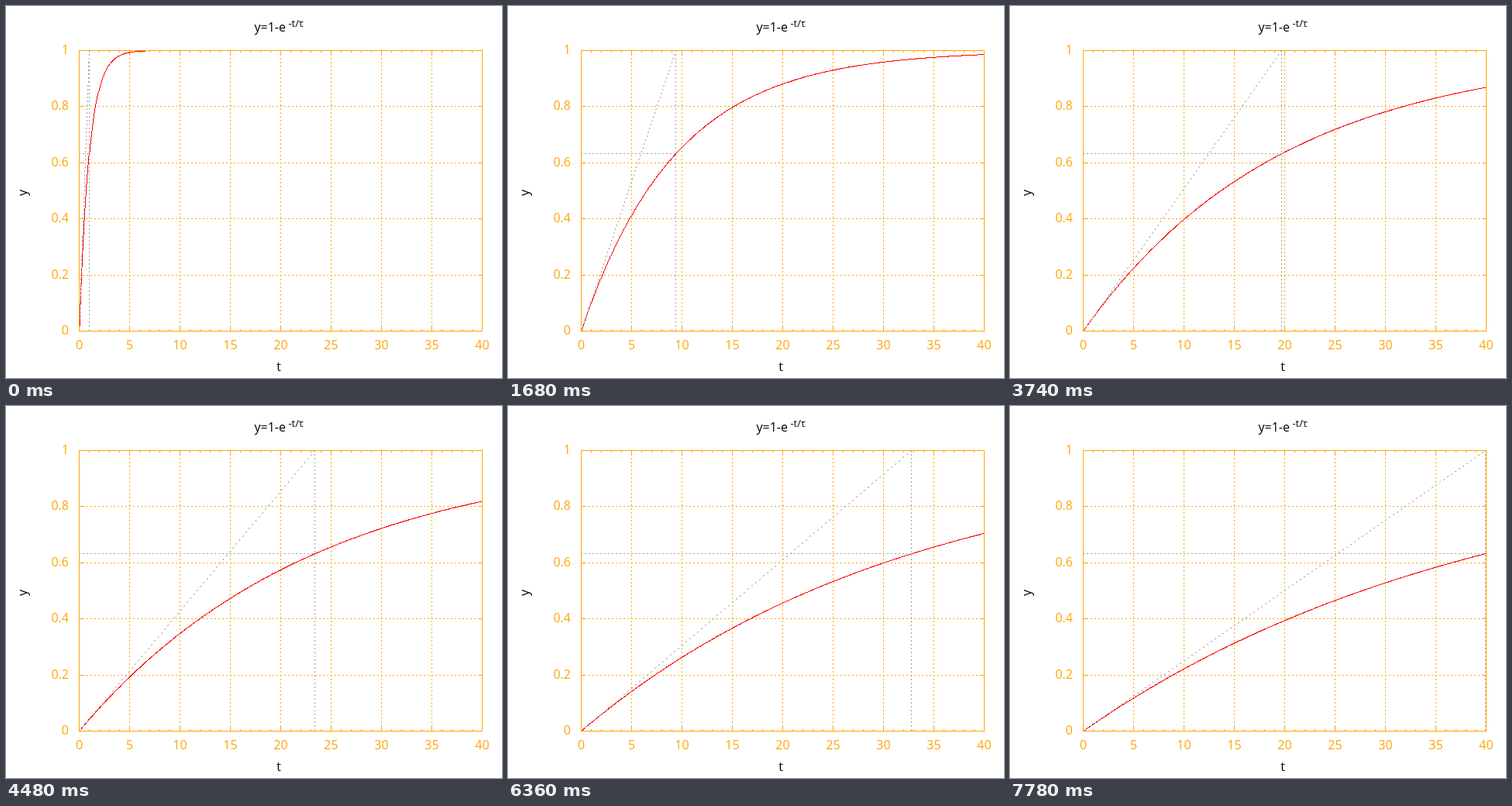
These frames come from a looping animation (640 by 480 pixels, 7800 ms). An HTML page with a canvas:

```html
<!DOCTYPE html>
<html lang="en">
<head>
<meta charset="utf-8">
<title>Step response</title>
<style>
  html, body { margin: 0; width: 100%; height: 100%; overflow: hidden; background: #fff; }
  canvas, svg { position: absolute; left: 0; top: 0; width: 640px; height: 480px; }
  text { font: 16px "Open Sans", "Noto Sans", sans-serif; }
  .axis text { fill: #ffa500; }
  text.sup { font-size: 12.8px; }
</style>
</head>
<body>
<canvas id="plot" width="640" height="480"></canvas>
<svg id="labels" viewBox="0 0 640 480">
  <text x="320.5" y="33">y=1-e</text>
  <text class="sup" x="364.5" y="27">-t/τ</text>
  <text x="352" y="471" text-anchor="middle">t</text>
  <text transform="translate(27 241) rotate(-90)" text-anchor="middle">y</text>
  <g class="axis" id="axis"></g>
</svg>
<script>
const LEFT = 94, RIGHT = 614, TOP = 57, BOTTOM = 419;
const ORANGE = '#ffa500', GRAY = '#a0a0a0', RED = '#ff0000';
const STEP_MS = 20, STEPS = 390, SAMPLES = 1000;
const ctx = document.getElementById('plot').getContext('2d');

const px = t => Math.round(LEFT + t * (RIGHT - LEFT) / 40);
const py = y => Math.round(BOTTOM - y * (BOTTOM - TOP));

// Unsmoothed one-pixel line, walked rightwards, or downwards if steep.
// Dashed lines are two pixels on, three off.
function line(x0, y0, x1, y1, color, dashed) {
  const dx = x1 - x0, dy = y1 - y0;
  const steep = Math.abs(dy) > Math.abs(dx);
  if ((steep ? dy : dx) < 0) return line(x1, y1, x0, y0, color, dashed);
  const n = Math.max(steep ? dy : dx, 1);
  ctx.fillStyle = color;
  for (let i = 0; i <= n; i++) {
    if (dashed && i % 5 > 1) continue;
    ctx.fillRect(Math.round(x0 + dx * i / n), Math.round(y0 + dy * i / n), 1, 1);
  }
}

function drawGrid() {
  for (let i = 1; i < 5; i++) {
    const y = py(i / 5);
    line(LEFT, y, RIGHT, y, ORANGE, true);
    line(LEFT, y, LEFT + 5, y, ORANGE);
    line(RIGHT - 5, y, RIGHT, y, ORANGE);
  }
  for (let t = 1; t < 40; t++) {
    const x = px(t), major = t % 5 === 0, len = major ? 5 : 2;
    if (major) line(x, TOP, x, BOTTOM, ORANGE, true);
    line(x, TOP, x, TOP + len, ORANGE);
    line(x, BOTTOM - len, x, BOTTOM, ORANGE);
  }
}

// The dense samples snap to whole pixels, which thickens the slopes.
function drawCurve(tau) {
  let x = LEFT, y = BOTTOM;
  for (let i = 1; i < SAMPLES; i++) {
    const t = 40 * i / (SAMPLES - 1);
    const nx = px(t), ny = py(1 - Math.exp(-t / tau));
    line(x, y, nx, ny, RED);
    x = nx;
    y = ny;
  }
}

function drawGuides(tau) {
  const x = px(tau), y = py(1 - Math.exp(-1));
  line(LEFT, BOTTOM, x, TOP, GRAY, true);
  line(x, TOP, x, BOTTOM, GRAY, true);
  line(LEFT, y, x, y, GRAY, true);
}

function drawBorder() {
  line(LEFT, TOP, RIGHT, TOP, ORANGE);
  line(LEFT, BOTTOM, RIGHT, BOTTOM, ORANGE);
  line(LEFT, TOP, LEFT, BOTTOM, ORANGE);
  line(RIGHT, TOP, RIGHT, BOTTOM, ORANGE);
}

function addLabel(value, x, y, anchor) {
  const el = document.createElementNS('http://www.w3.org/2000/svg', 'text');
  el.setAttribute('x', x);
  el.setAttribute('y', y);
  el.setAttribute('text-anchor', anchor);
  el.textContent = value;
  document.getElementById('axis').append(el);
}

for (let t = 0; t <= 40; t += 5) addLabel(t, px(t) + 0.5, 443, 'middle');
for (let i = 0; i <= 5; i++) addLabel(i / 5, 81, py(i / 5) + 5, 'end');

const start = performance.now();
let shown = -1;

function frame() {
  const step = Math.floor((performance.now() - start) / STEP_MS) % STEPS;
  if (step !== shown) {
    shown = step;
    const tau = 1 + step / 10;
    ctx.clearRect(0, 0, 640, 480);
    drawGrid();
    drawCurve(tau);
    drawGuides(tau);
    drawBorder();
  }
  requestAnimationFrame(frame);
}
frame();
</script>
</body>
</html>
```
